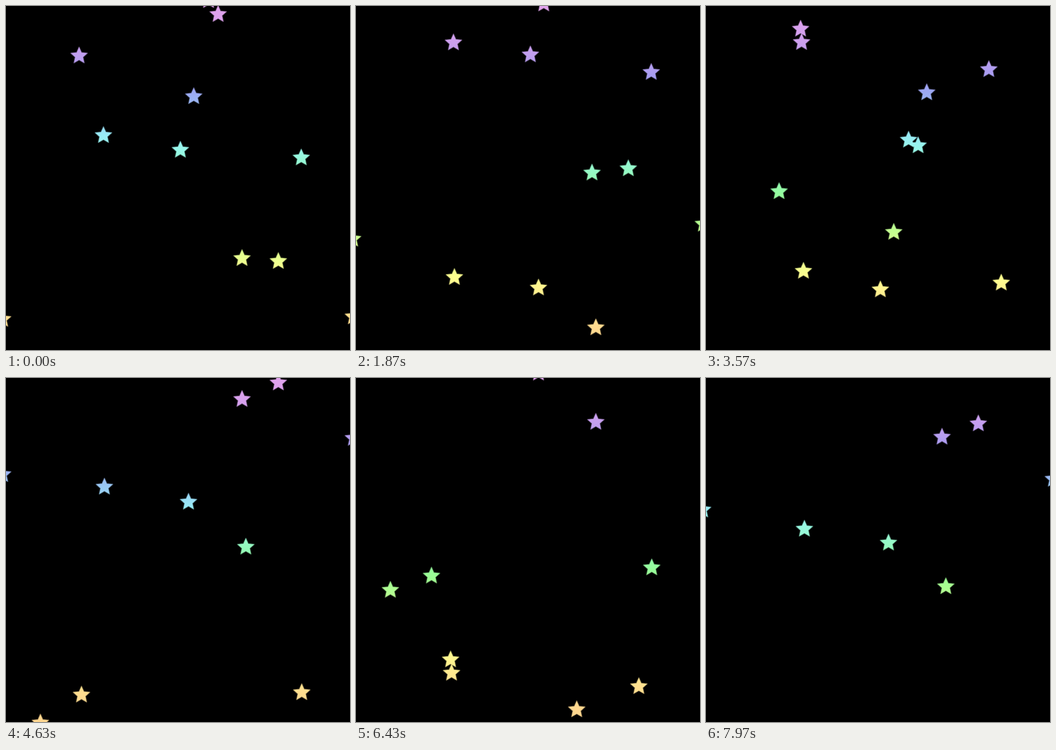
These frames come from a looping animation (720x720 px, 8000 ms). An HTML page with a canvas:

```html
<!DOCTYPE html>
<html lang="en">
<head>
<meta charset="utf-8">
<title>Falling stars</title>
<style>
  html, body { margin: 0; width: 100%; height: 100%; overflow: hidden; background: #000; }
  canvas { display: block; width: 720px; height: 720px; }
</style>
</head>
<body>
<canvas id="sky" width="720" height="720"></canvas>
<script>
const SIZE = 720;
const LOOP = 8000;      // whole animation, ms
const CLIP = 3216.7;    // the shower restarts with a hard cut after this time
const SHOWER = 2168;    // time until the same stars fall again
const SKIP = 37;        // lead of the shower after the opening frame of a clip
const FPS = 30;
const RADIUS = 18;

// Layers of equal speed in px/ms; each star is [x, time it passes mid-stage].
const layers = [
  { speed: .635, stars: [[-7, 1701]] },
  { speed: .677, stars: [[618, 61], [158, 1004], [494, 1918]] },
  { speed: .71, stars: [[444, 481], [619, 1032], [502, 1461]] },
  { speed: .734, stars: [[204, 120], [393, 231], [153, 347], [462, 629],
                         [592, 695], [382, 1589], [727, 1771], [570, 1929]] },
  { speed: .755, stars: [[365, 76], [424, 491], [72, 973], [206, 1627]] },
  { speed: .775, stars: [[200, 752], [198, 788]] }
];

const ctx = document.getElementById('sky').getContext('2d');

// Violet at the top to amber at the bottom, eased through cyan and green.
function rainbowColor(p) {
  const q = p ** .84;
  const hue = 290 - 252 * q * q * (3 - 2 * q);
  return `hsl(${hue}, ${Math.min(100, 65 + 50 * p)}%, 78%)`;
}

function makeRainbow(steps) {
  const gradient = ctx.createLinearGradient(0, 0, 0, SIZE);
  for (let i = 0; i <= steps; i++) gradient.addColorStop(i / steps, rainbowColor(i / steps));
  return gradient;
}

function makeStar() {
  const path = new Path2D();
  for (let i = 0; i < 10; i++) {
    const r = i % 2 ? RADIUS * .47 : RADIUS;
    const angle = i * Math.PI / 5;
    path.lineTo(r * Math.sin(angle), -r * Math.cos(angle));
  }
  path.closePath();
  return path;
}

const rainbow = makeRainbow(24);
const star = makeStar();

function drawStar(x, y) {
  const placed = new Path2D();
  placed.addPath(star, new DOMMatrix().translate(x, y));
  ctx.globalAlpha = .45;
  ctx.stroke(placed);
  ctx.globalAlpha = 1;
  ctx.fill(placed);
}

function showerTime(time) {
  const t = time % CLIP;
  return t < 1000 / FPS ? 0 : t + SKIP;
}

// Time since the nearest pass through mid-stage, negative before it.
function sincePass(t, pass) {
  return (t - pass + SHOWER * 1.5) % SHOWER - SHOWER / 2;
}

function draw(time) {
  const t = showerTime(time);
  ctx.fillStyle = '#000';
  ctx.fillRect(0, 0, SIZE, SIZE);
  ctx.fillStyle = ctx.strokeStyle = rainbow;
  ctx.lineWidth = 2.5;
  ctx.lineJoin = 'round';
  for (const { speed, stars } of layers) {
    for (const [x, pass] of stars) drawStar(x, SIZE / 2 - 1 + speed * sincePass(t, pass));
  }
}

const start = performance.now();

function tick() {
  const time = (performance.now() - start) % LOOP;
  draw(Math.floor((time + 4) * FPS / 1000) * 1000 / FPS % LOOP);
  requestAnimationFrame(tick);
}
tick();
</script>
</body>
</html>
```
